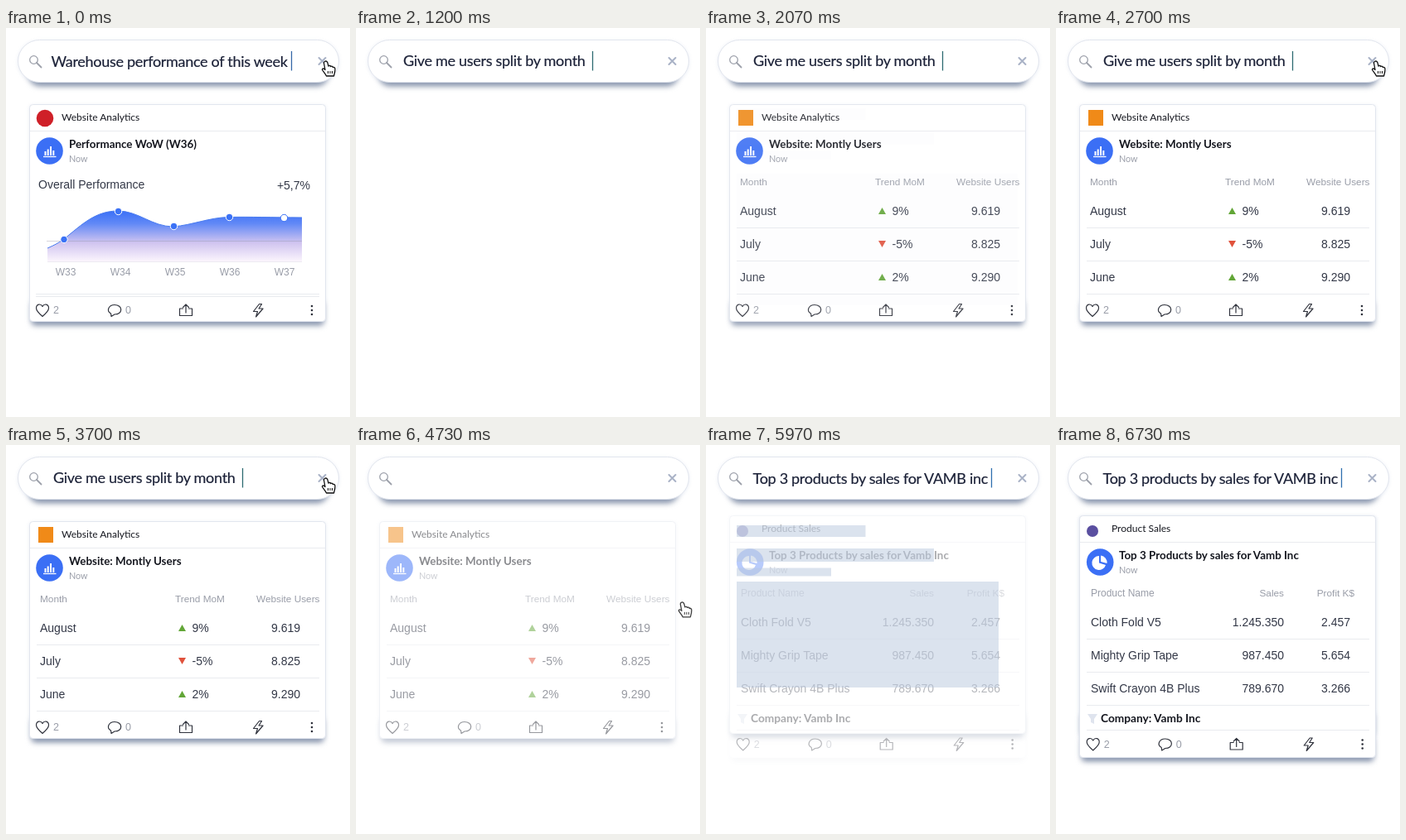
Animation, 415 px wide and 470 px high, one loop 8 s. Source, as an HTML page:

```html
<!DOCTYPE html>
<html lang="en">
<head>
<meta charset="utf-8">
<title>Search cards</title>
<style>
html, body { margin: 0; width: 100%; height: 100%; overflow: hidden; background: #fff; }
svg { display: block; }
text { font-family: "Liberation Sans", Arial, sans-serif; fill: #333847; white-space: pre; }
.lato { font-family: Lato, sans-serif; fill: #15171f; }
.bold { font-weight: 700; }
.query { font-size: 18px; letter-spacing: -.3px; fill: #1c2238; stroke: #1c2238; stroke-width: .2; }
.muted { fill: #999da8; }
.icon { fill: none; stroke: #30333d; stroke-width: 1.2; stroke-linejoin: round; stroke-linecap: round; }
.rule { stroke: #e9ebef; stroke-width: 1; }
.shadow { fill: #78869f; filter: blur(3.5px); }
.glow { fill: #c3cde2; filter: blur(2px); opacity: .35; }
</style>
</head>
<body>
<svg id="stage" width="415" height="470" viewBox="0 0 415 470"></svg>
<script>
const stage = document.getElementById('stage');

const label = (x, y, size, str, cls = '', anchor = 'start') =>
  `<text x="${x}" y="${y}" font-size="${size}" class="${cls}" text-anchor="${anchor}">${str}</text>`;
const rule = y => `<path class="rule" d="M37 ${y}.5H378"/>`;
const rect = (x, y, w, h, attrs = '') => `<rect x="${x}" y="${y}" width="${w}" height="${h}" ${attrs}/>`;

function panel(x, y, w, h, r, inset) {
  return rect(x + inset, y + h - 24, w - 2 * inset, 28, `rx="${Math.min(r, 13)}" class="shadow"`) +
    rect(x, y + 1, w, h, `rx="${r}" class="glow"`) +
    rect(x + .5, y + .5, w - 1, h - 1, `rx="${r}" fill="#fff" stroke="#e2e6ee"`);
}
const cardPanel = (top, height) => panel(28, top, 358, height, 4, 3);

function footer(dx, dy) {
  const dots = [336, 341, 346].map(y => `<circle cx="369" cy="${y}" r="1.3" fill="#30333d"/>`).join('');
  return `<g transform="translate(${dx} ${dy})">
    <g class="icon">
      <path d="M44 348.5C40 345 36.5 342 36.5 338.5C36.5 333.5 42 332.5 44 336.5C46 332.5 51.5 333.5 51.5 338.5C51.5 342 48 345 44 348.5Z"/>
      <path d="M126.5 345C120.5 341.5 124 334.5 131 334.5C141 334.5 141.5 346 131 346L127 348.5Z"/>
      <path d="M213.5 339H209.5V347.5H224.5V339H220.5M217 344V334M213.5 337.5L217 334L220.5 337.5"/>
      <path d="M305.5 333.5L298.5 342.5H303.5L301.5 349L310 339H305L308.5 333.5Z"/>
    </g>${dots}
    ${label(57, 345, 12.5, '2', 'muted')}${label(144, 345, 12.5, '0', 'muted')}
  </g>`;
}

function card({ top, frame, dx, source, title, logo, icon, body, footerY }) {
  return frame + logo +
    label(67, top + 20, 12, source, 'lato') +
    `<path class="rule" d="M29 ${top + 32.5}H385"/>` +
    `<circle cx="${52.5 + dx}" cy="${top + 56.5}" r="16.3" fill="#3b6ff5"/>` + icon +
    label(76, top + 52.5, 13.4, title, 'lato bold') +
    label(76, top + 70, 10.8, 'Now', 'lato muted') + body + footer(dx, footerY);
}

const barsIcon = `<path d="M45 155.5H60.5" stroke="#fff" stroke-width="1.3"/>
  <path d="M47.5 154V149M50.7 154V146.5M54 154V143M57.3 154V148" stroke="#fff" stroke-width="2"/>`;
const pieIcon = `<path d="M52 134A8.5 8.5 0 1 0 60 145L52 142.5Z" fill="#fff"/>
  <path d="M54 133.5A8.5 8.5 0 0 1 61.5 143L54 141Z" fill="#fff"/>`;

function chart() {
  const line = 'M50 266C57 263 63 260 70 255C92 237 108 221 135 221C160 221 176 240 202 240C225 238 245 229 269 228.5C295 228 320 229 357 229';
  const dots = [[70, 255.5], [135.5, 221.5], [202.5, 239.5], [269.5, 228.5], [335.5, 229.5]].map(([x, y], i) =>
    `<circle cx="${x}" cy="${y}" r="4.2" fill="${i < 4 ? '#3b72f6' : '#fff'}" stroke="${i < 4 ? '#fff' : '#3b72f6'}"/>`).join('');
  const weeks = [33, 34, 35, 36, 37].map((n, i) => label(72 + i * 66, 299, 12, 'W' + n, 'muted', 'middle')).join('');
  return `<defs><linearGradient id="area" gradientUnits="userSpaceOnUse" x1="0" y1="221" x2="0" y2="283">
      <stop offset="0" stop-color="#3a70f7"/><stop offset=".25" stop-color="#6289f6"/>
      <stop offset=".62" stop-color="#d0c4f0"/><stop offset="1" stop-color="#fdf7fd"/>
    </linearGradient></defs>
    ${label(39, 194, 14, 'Overall Performance')}${label(367, 195, 14, '+5,7%', '', 'end')}
    <path d="${line}V283H50Z" fill="url(#area)"/>
    <path d="M49 257.5H357" stroke="#9a96a8" stroke-opacity=".4"/>
    <path d="M50 282.5H357" stroke="#eeeaf2"/>
    <path d="${line}" fill="none" stroke="#4a7cf0"/>${dots}${weeks}
    <path class="rule" d="M36 321.5H378M36 324.5H378"/>`;
}

function monthTable() {
  const rows = [['August', '9%', '9.619', 1], ['July', '-5%', '8.825', 0], ['June', '2%', '9.290', 1]];
  return label(41, 190, 11.8, 'Month', 'muted') + label(204, 190, 11.8, 'Trend MoM', 'muted') +
    label(302, 190, 11.8, 'Website Users', 'muted') +
    rows.map(([month, trend, users, up], i) => {
      const y = 226 + i * 40;
      const arrow = up ? `M208 ${y - 1}L212.5 ${y - 9}L217 ${y - 1}Z` : `M208 ${y - 9}L212.5 ${y - 1}L217 ${y - 9}Z`;
      return label(41, y, 14, month) + `<path d="${arrow}" fill="${up ? '#62a637' : '#e0523c'}"/>` +
        label(224.5, y, 14, trend) + label(355, y, 14, users, '', 'end') + rule(y + 15);
    }).join('');
}

function productTable() {
  const rows = [['Cloth Fold V5', '1.245.350', '2.457'], ['Mighty Grip Tape', '987.450', '5.654'],
    ['Swift Crayon 4B Plus', '789.670', '3.266']];
  return label(42, 183, 12, 'Product Name', 'muted') + label(275, 183, 11.8, 'Sales', 'muted', 'end') +
    label(360, 183, 11.8, 'Profit K$', 'muted', 'end') +
    rows.map(([name, sales, profit], i) => {
      const y = 219 + i * 40;
      return label(42, y, 14, name) + label(275, y, 14, sales, '', 'end') +
        label(355, y, 14, profit, '', 'end') + rule(y + 15);
    }).join('') +
    '<path d="M38 325H50L46 331V337L42 335V331Z" fill="#dfe4ee"/>' +
    label(54, 335, 13.7, 'Company: Vamb Inc', 'lato bold') + rule(344);
}

const cards = [
  { top: 92, frame: cardPanel(92, 263), dx: 0, footerY: 0, source: 'Website Analytics', title: 'Performance WoW (W36)',
    logo: '<circle cx="47" cy="109" r="10.3" fill="#cf2028"/>', icon: barsIcon, body: chart() },
  { top: 92, frame: cardPanel(92, 263), dx: 0, footerY: 0, source: 'Website Analytics', title: 'Website: Montly Users',
    logo: rect(39, 99, 18, 19, 'fill="#f08a18"'), icon: barsIcon, body: monthTable() },
  { top: 85, frame: cardPanel(85, 264) + `<g id="tallPanel">${cardPanel(85, 293)}</g>`, dx: .7, footerY: 20.5,
    source: 'Product Sales', title: 'Top 3 Products by sales for Vamb Inc',
    logo: '<circle cx="44" cy="104" r="7" fill="#5a4fa0"/>', icon: pieIcon, body: productTable() }
];

const queries = [
  { text: 'Warehouse performance of this week', x: 54.5, y: 47, caret: 344.5, color: '#3568a8', type: [-2, -1], clear: [30, 200] },
  { text: 'Give me users split by month', x: 57, y: 46, caret: 285.5, color: '#2d6b70', type: [770, 1170], clear: [4530, 4700] },
  { text: 'Top 3 products by sales for VAMB inc', x: 56.5, y: 47, caret: 344.5, color: '#2e6fae', type: [5070, 5370], clear: [9000, 9001] }
];
const cardTimes = [[-2, -1, 30, 430], [1900, 2090, 4530, 4930], [5900, 6100, 9000, 9001]];

stage.innerHTML = panel(14, 14, 388, 52, 26, 14) +
  `<g fill="none" stroke-linecap="round">
    <g stroke="#9da1ab" stroke-width="1.3"><circle cx="33.5" cy="38.5" r="4.8"/><path d="M37 42L42.5 47.5" stroke-width="1.8"/></g>
    <path d="M377.5 36L385.5 44M385.5 36L377.5 44" stroke="#a9b2c6" stroke-width="2"/>
  </g>
  <text id="query" class="lato query"></text>
  <path id="caret" d="M0 28V51.5" stroke-width="1.3"/>` +
  cards.map((c, i) => `<g id="card${i}">${card(c)}</g>`).join('') +
  `<g id="skeleton" fill="#b9c8de">
    ${rect(37, 97, 155.5, 14)}${rect(37, 125, 238, 16)}${rect(37, 148.5, 114, 10)}<rect id="block" x="37"/>
  </g>
  <g id="hand"><path d="M-4.5 -7.5C-2.5 -9 -1 -7 -.5 -4L0 -2C1 -3 2.5 -2.5 2.7 -1.5C4 -2.3 5 -1.5 5.3 -.5C7 -1 8 0 8 2C8 5 7.5 6.5 6.5 10H-2.5C-4 7 -6 5 -7.5 2.5C-7.5 .5 -5.5 .5 -4 2.5L-5.5 -5.5Q-5.7 -7 -4.5 -7.5Z"
    fill="#fff" stroke="#111" stroke-width="1.3" stroke-linejoin="round"/>
    <path d="M-.5 4V7M2 4V7M4.5 4V7" stroke="#111"/></g>`;

const el = id => document.getElementById(id);
const ramp = (t, a, b) => Math.min(1, Math.max(0, (t - a) / (b - a)));
const ease = k => k * k * (3 - 2 * k);

function show(node, opacity) {
  node.style.opacity = opacity;
  node.style.visibility = opacity > 0 ? 'visible' : 'hidden';
}

function drawQuery(t) {
  const q = queries.findLast(item => t >= item.type[0]);
  const typed = ramp(t, ...q.type);
  const opacity = 1 - ramp(t, ...q.clear);
  const text = el('query'), caret = el('caret');
  text.setAttribute('x', q.x);
  text.setAttribute('y', q.y);
  text.textContent = q.text.slice(0, Math.ceil(typed * q.text.length));
  const x = typed < 1 ? Math.min(q.caret, q.x + text.getComputedTextLength() + 5) : q.caret;
  caret.setAttribute('transform', `translate(${x} 0)`);
  caret.setAttribute('stroke', q.color);
  show(text, opacity);
  show(caret, opacity);
}

function drawCards(t) {
  cardTimes.forEach(([a, b, c, d], i) => show(el('card' + i), ramp(t, a, b) * (1 - ramp(t, c, d))));
  // Inherited visibility keeps the tall panel hidden with its card.
  el('tallPanel').style.opacity = ramp(t, 5950, 6100);
}

function drawSkeleton(t) {
  const first = t >= 1330 && t < 2150 ? .04 : 0;
  const second = ramp(t, 5370, 5830) * (1 - ramp(t, 5980, 6130));
  show(el('skeleton'), .5 * Math.max(first, second));
  const [y, width, height] = t < 5900 ? [176, 339, 159] : [165, 316, 128];
  Object.entries({ y, width, height }).forEach(([name, value]) => el('block').setAttribute(name, value));
}

function drawHand(t) {
  const away = t < 2700 ? 1 - ease(ramp(t, 2530, 2700)) : ease(ramp(t, 4560, 4860));
  const k = t < 600 ? 0 : away;
  el('hand').setAttribute('transform', `translate(${389 + 13 * k} ${48 + 248 * k})`);
  show(el('hand'), t < 600 || (t >= 2530 && t < 4860) ? 1 - ramp(t, 4700, 4860) : 0);
}

function render(t) {
  drawQuery(t);
  drawCards(t);
  drawSkeleton(t);
  drawHand(t);
}

const start = performance.now();
function frame() {
  render((performance.now() - start) % 8000);
  requestAnimationFrame(frame);
}
frame();
</script>
</body>
</html>
```
